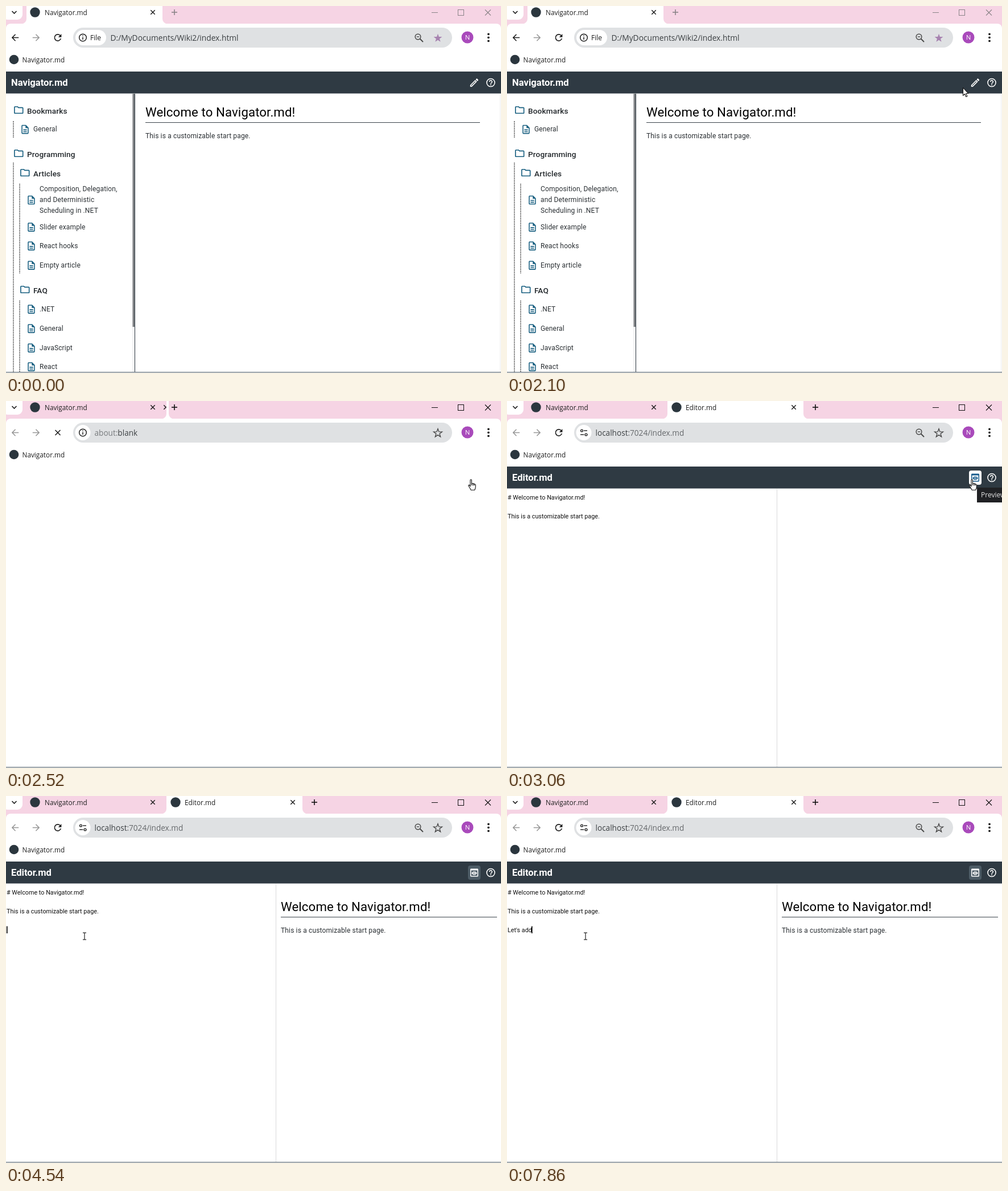
An HTML page with a canvas for the animation above (8000 ms loop, 870x644 px).

```html
<!DOCTYPE html>
<html lang="en">
<head>
<meta charset="utf-8">
<title>Browser walkthrough</title>
<style>
html, body { margin: 0; width: 100%; height: 100%; overflow: hidden; background: #fff; }
canvas { display: block; }
</style>
</head>
<body>
<canvas id="stage" width="870" height="644"></canvas>
<script>
const ctx = document.getElementById('stage').getContext('2d');
const LOOP = 8000;
const PINK = '#f6d4e4', DARK = '#2f3a43', INK = '#1f1f1f', TEAL = '#185f80', BLUE = '#175b8c';
const UI = '"Open Sans", sans-serif', PAGE = 'Roboto, sans-serif';

// 24-unit icons
const ICONS = {
  folder: 'M9.17 6l2 2H20v10H4V6h5.17M10 4H4c-1.1 0-2 .9-2 2v12c0 1.1.9 2 2 2h16c1.1 0 2-.9 2-2V8c0-1.1-.9-2-2-2h-8z',
  file: 'M8 16h8v2H8zm0-4h8v2H8zm6-10H6c-1.1 0-2 .9-2 2v16c0 1.1.9 2 2 2h12c1.1 0 2-.9 2-2V8zm4 18H6V4h7v5h5z',
  pencil: 'M14.06 9.02l.92.92L5.92 19H5v-.92zM17.66 3c-.25 0-.51.1-.7.29l-1.83 1.83 3.75 3.75 1.83-1.83c.39-.39.39-1.02 0-1.41l-2.34-2.34c-.2-.2-.45-.29-.71-.29zm-3.6 3.19L3 17.25V21h3.75L17.81 9.94z',
  preview: 'M19 3H5c-1.1 0-2 .9-2 2v14c0 1.1.9 2 2 2h14c1.1 0 2-.9 2-2V5c0-1.1-.9-2-2-2zm0 16H5V7h14zM12 9c-2.7 0-5 1.7-6 4 1 2.3 3.3 4 6 4s5-1.7 6-4c-1-2.3-3.3-4-6-4zm0 6.5a2.5 2.5 0 1 1 0-5 2.5 2.5 0 0 1 0 5zM13.5 13a1.5 1.5 0 1 1-3 0 1.5 1.5 0 0 1 3 0z',
  help: 'M11 18h2v-2h-2zM12 2a10 10 0 1 0 0 20 10 10 0 0 0 0-20zm0 18a8 8 0 1 1 0-16 8 8 0 0 1 0 16zm0-14c-2.2 0-4 1.8-4 4h2c0-1.1.9-2 2-2s2 .9 2 2c0 2-3 1.75-3 5h2c0-2.25 3-2.5 3-5 0-2.2-1.8-4-4-4z',
  back: 'M20 11H7.83l5.59-5.59L12 4l-8 8 8 8 1.41-1.41L7.83 13H20z',
  reload: 'M17.65 6.35A8 8 0 1 0 19.73 14h-2.08a6 6 0 1 1-1.43-6.22L13 11h7V4z'
};
for (const key in ICONS) ICONS[key] = new Path2D(ICONS[key]);

const ARROW = new Path2D('M.5.5V14.2L3.6 11.3 5.7 16.3 7.9 15.4 5.8 10.5H9.8Z');
const HAND = new Path2D('M4 13V2Q4 .7 5.2 .7T6.4 2V8Q7.6 6.8 8.8 8.2Q10 7.4 11.1 8.9Q12.5 8.4 13.3 10V14Q13.1 16.5 11.7 19.2H5.2Q3.6 16 1 12.3Q.4 10.6 2 10.4Q3.2 10.7 4 13Z');
const KNUCKLES = new Path2D('M6.4 8V11M8.8 8.2V11.4M11.1 8.9V11.6');

function text(str, x, y, size, color = INK, font = UI, weight = 400, spacing = 0) {
  ctx.font = `${weight} ${size}px ${font}`;
  ctx.letterSpacing = spacing + 'px';
  ctx.fillStyle = color;
  ctx.fillText(str, x, y);
  const width = ctx.measureText(str).width;
  ctx.letterSpacing = '0px';
  return width;
}
const body = (str, x, y) => text(str, x, y, 12, '#2a2f33', PAGE, 400, .15);

function rect(x, y, w, h, color, radius = 0) {
  ctx.fillStyle = color;
  ctx.beginPath();
  ctx.roundRect(x, y, w, h, radius);
  ctx.fill();
}
function disc(x, y, r, color) {
  ctx.fillStyle = color;
  ctx.beginPath();
  ctx.arc(x, y, r, 0, 7);
  ctx.fill();
}
function ring(x, y, r, color, width) {
  ctx.strokeStyle = color;
  ctx.lineWidth = width;
  ctx.beginPath();
  ctx.arc(x, y, r, 0, 7);
  ctx.stroke();
}
function line(points, color, width = 1, dash = []) {
  ctx.strokeStyle = color;
  ctx.lineWidth = width;
  ctx.setLineDash(dash);
  ctx.beginPath();
  points.forEach(([x, y]) => ctx.lineTo(x, y));
  ctx.stroke();
  ctx.setLineDash([]);
}
function icon(name, cx, cy, scale, color, flip = 1) {
  ctx.save();
  ctx.translate(cx, cy);
  ctx.scale(scale * flip, scale);
  ctx.translate(-12, -12);
  ctx.fillStyle = color;
  ctx.fill(ICONS[name], 'evenodd');
  ctx.restore();
}
function cross(x, y, r, color = INK, width = 1.5) {
  line([[x - r, y - r], [x + r, y + r]], color, width);
  line([[x - r, y + r], [x + r, y - r]], color, width);
}
function plus(x, y, color) {
  line([[x - 5, y], [x + 5, y]], color, 1.6);
  line([[x, y - 5], [x, y + 5]], color, 1.6);
}
function star(x, y, filled) {
  ctx.beginPath();
  for (let i = 0; i < 10; i++) {
    const r = i % 2 ? 3.2 : 7.8, a = i * Math.PI / 5 - Math.PI / 2;
    ctx.lineTo(x + r * Math.cos(a), y + r * Math.sin(a));
  }
  ctx.closePath();
  ctx.lineWidth = 1.4;
  ctx.strokeStyle = ctx.fillStyle = filled ? '#a783b0' : '#474747';
  if (filled) ctx.fill(); else ctx.stroke();
}

function tabShape(left, right) {
  ctx.fillStyle = '#fff';
  ctx.beginPath();
  ctx.moveTo(left - 9, 31.5);
  ctx.arcTo(left, 31.5, left, 22, 9);
  ctx.lineTo(left, -1);
  ctx.lineTo(right, -1);
  ctx.arcTo(right, 31.5, right + 9, 31.5, 9);
  ctx.lineTo(right + 9, 31.5);
  ctx.fill();
}

function clipped(x, w, draw) {
  ctx.save();
  ctx.beginPath();
  ctx.rect(x, 0, w, 31);
  ctx.clip();
  draw();
  ctx.restore();
}

// Share of the new tab's width, in hard steps
const tabGrowth = t => t < 2590 ? 0 : t < 2660 ? .45 : t < 2720 ? .82 : 1;

function drawTabs(t) {
  const opened = t >= 2520, right = 275 + 246 * tabGrowth(t);
  const control = t >= 2370 ? '#111' : '#8a8488';
  rect(0, 0, 870, 40, PINK);
  rect(0, 31, 870, 613, '#fff', [8, 8, 0, 0]);
  rect(-6, -10, 35, 34, '#fff', 9);
  line([[10.5, 9], [14.5, 13], [18.5, 9]], INK, 1.7);

  if (opened) tabShape(282, Math.max(286, right)); else tabShape(36, 275);
  disc(51, 11, 8.7, '#2b363e');
  text('Navigator.md', 68, 16, 11.8);
  cross(258, 11, 3.7);
  if (opened) {
    clipped(277, Math.max(4.5, right - 277), () => {
      if (right > 320) {
        disc(298, 11, 8.7, '#2b363e');
        clipped(277, right - 305, () => text('Editor.md', 314, 16, 11.8));
      }
      cross(Math.max(281, right - 17), 11, 3.7);
    });
  }
  plus(right + 21, 11, control);

  line([[748, 11.5], [759, 11.5]], control);
  ctx.strokeRect(794.5, 6.5, 10, 10);
  cross(847, 11.5, 5, control, 1.1);
}

function drawToolbar(t) {
  const home = t < 2520, blank = !home && t < 2590;
  icon('back', 16, 55.5, .78, home ? INK : '#999');
  icon('back', 53, 55.5, .78, '#999', -1);
  if (blank) cross(91, 55.5, 4.5, INK, 1.6); else icon('reload', 91, 55.5, .8, INK);

  rect(118, 38, 666, 35, '#dfe1e3', 17.5);
  if (home) rect(122, 42, 54, 27, '#fff', 13.5); else disc(135, 55.5, 13.5, '#fff');
  if (home || blank) {
    ring(135, 55.5, 6.3, INK, 1.5);
    line([[135, 54.5], [135, 59]], INK, 1.5);
    line([[135, 51.6], [135, 53.1]], INK, 1.5);
  } else {
    ring(131.5, 52, 1.9, INK, 1.4);
    line([[135, 52], [141, 52]], INK, 1.4);
    ring(139, 59, 1.9, INK, 1.4);
    line([[129, 59], [135.3, 59]], INK, 1.4);
  }
  if (home) {
    text('File', 148, 60, 12);
    text('D:/MyDocuments/Wiki2/index.html', 183.5, 61, 13.78, '#3c4043');
  } else {
    const [lead, rest, grey] = blank ? ['about:', 'blank', 1] : ['localhost', ':7024/index.md', 0];
    const w = text(lead, 155.5, 61, 13.6, grey ? '#777a7d' : '#3c4043');
    text(rest, 155.5 + w, 61, 13.6, grey ? '#3c4043' : '#66696c');
  }
  if (!blank) {
    ring(724, 54, 4.8, '#474747', 1.5);
    line([[727.5, 57.5], [733, 63]], '#474747', 1.8);
    line([[721.7, 54], [726.3, 54]], '#474747', 1.3);
  }
  star(759, 56.5, home);
  disc(811, 55, 10.5, '#a94abb');
  ctx.textAlign = 'center';
  text('N', 811, 59.2, 11.5, '#fff');
  ctx.textAlign = 'left';
  for (const y of [49.3, 55.3, 61.3]) disc(848, y, 1.9, INK);

  disc(14, 94, 8.3, '#2b363e');
  text('Navigator.md', 28.5, 98.5, 11.8);
}

function drawHeader(title) {
  rect(0, 115, 870, 38.5, DARK);
  text(title, 9, 139.5, 16.6, '#fff', PAGE, 700);
  icon('help', 852, 134.5, .78, '#fff');
}

function drawArticle(x, y, right) {
  text('Welcome to Navigator.md!', x, y, 22.2, '#000', PAGE, 400, .12);
  rect(x, y + 10, right - x, 1, '#3b444b');
  body('This is a customizable start page.', x, y + 37.6);
}

const FOLDERS = [['Bookmarks', 14, 183], ['Programming', 14, 259], ['Articles', 25, 293], ['FAQ', 25, 498]];
const FILES = [
  ['General', 27, 216], ['Slider example', 38, 387.5], ['React hooks', 38, 420.5], ['Empty article', 38, 454.5],
  ['.NET', 38, 531.5], ['General', 38, 565.5], ['JavaScript', 38, 599.5], ['React', 38, 632.5]
];

function drawSidebar() {
  for (const [x, top, bottom] of [[13, 202, 231], [13, 275, 642], [24, 312, 469], [24, 517, 642]])
    line([[x, top], [x, bottom]], '#2b2b2b', 1.6, [1.5, 1.5]);
  for (const [name, x, y] of FOLDERS) {
    icon('folder', x + 8.3, y - .5, .82, TEAL);
    text(name, x + 23, y + 5.7, 13.6, '#23282c', PAGE, 500, .15);
  }
  for (const [name, x, y] of FILES) {
    icon('file', x + 6.5, y + .6, .78, TEAL);
    body(name, x + 21, y + 4.2);
  }
  icon('file', 44.5, 340.5, .78, TEAL);
  ['Composition, Delegation,', 'and Deterministic', 'Scheduling in .NET']
    .forEach((str, i) => body(str, 59, 325.3 + i * 18.6));
}

function drawHome(t, hover) {
  drawHeader('Navigator.md');
  if (hover) rect(812, 122, 22, 25, '#fff', 4);
  icon('pencil', 823, 134.5, .8, hover ? BLUE : '#fff');
  drawSidebar();
  rect(222, 154, 5, 488, '#f3f3f3');
  rect(222.5, 154, 3.5, 409, '#7d8083');
  rect(226, 154, 1, 488, DARK);
  rect(868, 154, 1, 488, '#ececec');
  drawArticle(245, 194, 833);
  if (t >= 2300) {
    ctx.globalAlpha = t < 2370 ? .5 : 1;
    rect(0, 619, 180, 24, PINK, [0, 4, 0, 0]);
    text('https://localhost:7024/index.md', -4, 635, 11.75, '#444');
    ctx.globalAlpha = 1;
  }
}

// [time, typed length, caret visible]
const TYPED = "Let's add";
const KEYS = [
  [4540, 0, 1], [5000, 0, 0], [5480, 0, 1], [5880, 1, 1], [6210, 2, 1], [6270, 3, 1], [6470, 4, 1],
  [6670, 5, 1], [6870, 6, 1], [7400, 6, 0], [7460, 7, 1], [7720, 8, 1], [7860, 9, 1]
];

function drawEditor(t, hover) {
  const open = t >= 3590;
  const write = (str, y) => text(str, 1, y, 10.82, '#111', PAGE);
  drawHeader('Editor.md');
  if (open) rect(812, 122, 22, 25, '#4d5c66', 4);
  else if (hover) rect(812, 122, 22, 25, '#fff', 4);
  icon('preview', 823, 134.5, .78, hover && !open ? BLUE : '#fff');
  rect(474, 154, 1, 488, '#d9dadb');
  if (t >= 2720) {
    write('# Welcome to Navigator.md!', 173);
    write('This is a customizable start page.', 206);
  }
  if (open) drawArticle(483, 202, 863);
  const key = KEYS.findLast(k => t >= k[0]);
  if (key) {
    const w = write(TYPED.slice(0, key[1]), 238.5);
    if (key[2]) rect(Math.max(1, Math.round(w)), 228.5, 1.6, 12.5, '#000');
  }
  if (t >= 3060 && hover && !open) {
    rect(826, 152, 50, 26, '#202124');
    text('Preview', 833, 169, 12, '#e3e3e3');
  }
}

const easeOut = p => 1 - (1 - p) ** 1.25;
const easeInOut = p => p * p * (3 - 2 * p);
const MOVES = [
  { start: 450, end: 590, steps: 3, from: [830, 630], to: [656, 493], ease: p => p },
  { start: 790, end: 1070, steps: 5, from: [656, 493], to: [490, 238], ease: easeOut },
  { start: 1470, end: 2170, steps: 11, from: [488, 235], to: [817, 138], ease: easeOut },
  { start: 3590, end: 4330, steps: 11, from: [817, 138], to: [140, 245], ease: easeInOut },
  { start: 4400, end: 4540, steps: 3, from: [147, 253], to: [138, 246], ease: p => p }
];

// The pointer jumps in even steps, the first one at the start time
function pointerAt(t) {
  const m = MOVES.findLast(move => t >= move.start);
  if (!m) return null;
  const gap = (m.end - m.start) / (m.steps - 1);
  const step = Math.min(m.steps, Math.floor((t - m.start) / gap + 1e-6) + 1);
  const p = m.ease(step / m.steps);
  return m.from.map((a, i) => Math.round(a + (m.to[i] - a) * p));
}

function drawPointer([x, y], hover, t) {
  ctx.save();
  ctx.translate(x, y);
  ctx.lineJoin = 'round';
  ctx.lineWidth = 1.1;
  ctx.strokeStyle = '#111';
  ctx.fillStyle = '#fff';
  if (hover) {
    ctx.translate(-5, -1);
    ctx.fill(HAND);
    ctx.stroke(HAND);
    ctx.stroke(KNUCKLES);
  } else if (t >= 2660 && x < 474 && y > 154) {
    line([[0, -6], [0, 6]], '#222', 1.2);
    for (const end of [-6, 6]) line([[-3, end], [3, end]], '#222', 1.2);
  } else {
    ctx.fill(ARROW);
    ctx.stroke(ARROW);
  }
  ctx.restore();
}

function render(t) {
  const pointer = pointerAt(t);
  const hover = pointer && pointer[0] >= 812 && pointer[0] <= 834 && pointer[1] >= 122 && pointer[1] <= 147;
  ctx.clearRect(0, 0, 870, 644);
  drawTabs(t);
  drawToolbar(t);
  if (t < 2520) drawHome(t, hover);
  else if (t >= 2660) drawEditor(t, hover);
  rect(0, 642, 870, 1, '#68747e');
  rect(0, 643, 870, 1, '#d5d8da');
  if (pointer) drawPointer(pointer, hover, t);
}

const began = performance.now();
function tick() {
  render((performance.now() - began) % LOOP);
  requestAnimationFrame(tick);
}
tick();
</script>
</body>
</html>
```
